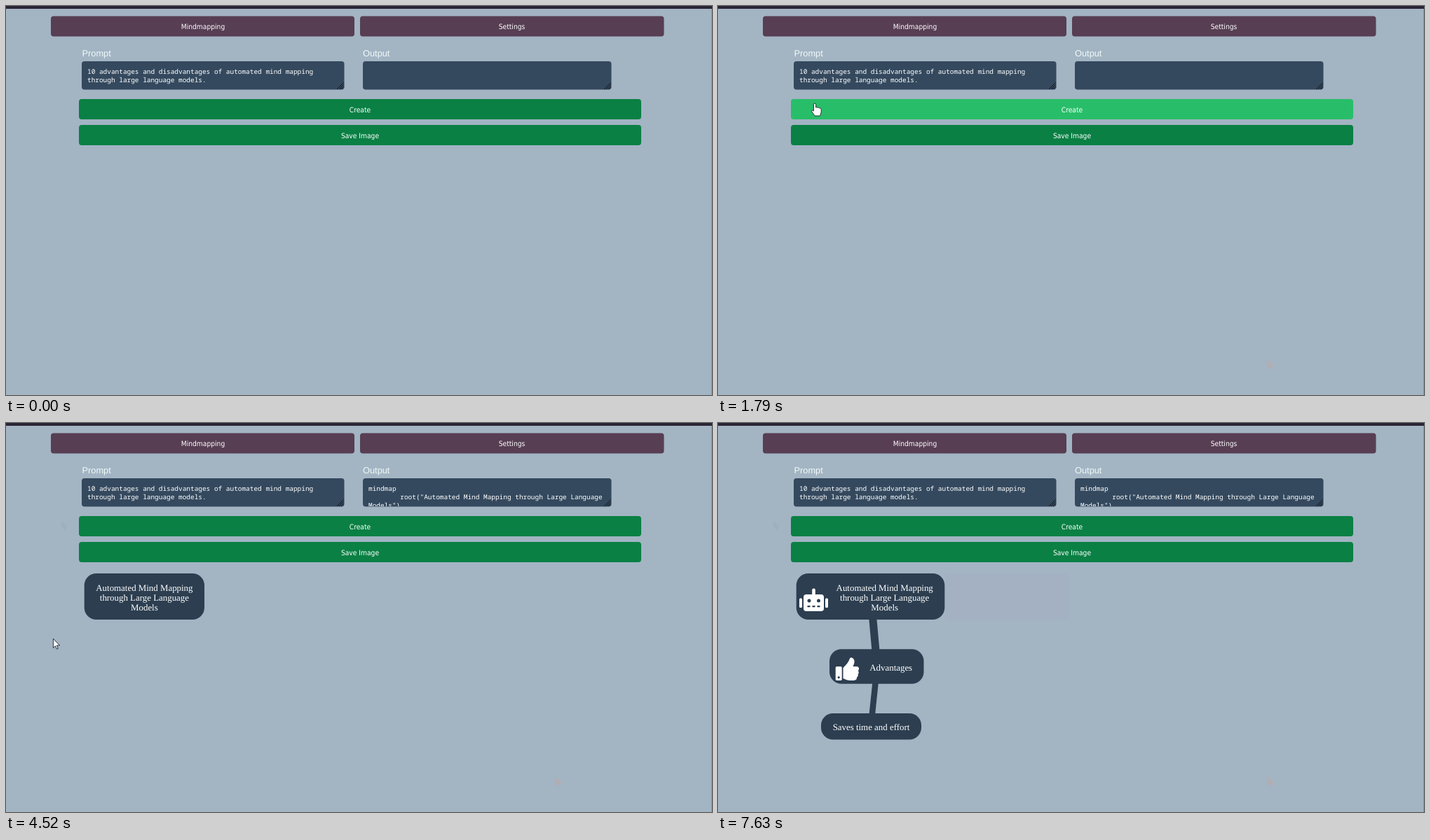
These frames come from a looping animation (1007x556 px, 8 s). An HTML page:

```html
<!DOCTYPE html>
<html lang="en">
<head>
<meta charset="utf-8">
<title>Mind mapping</title>
<style>
  html, body { margin: 0; width: 100%; height: 100%; overflow: hidden; background: #a3b4c3; }
  svg { display: block; }
  text { fill: #fff; text-rendering: geometricPrecision; white-space: pre; }
  .button { font: 10.2px "DejaVu Sans Condensed", Roboto, sans-serif; text-anchor: middle; }
  .label { font: 12.8px "Liberation Sans", Arial, sans-serif; fill: #effaf8; }
  .code { font: 9.43px "Noto Sans Mono", "DejaVu Sans Mono", monospace; }
  .node { font: 12.9px "Liberation Serif", "Times New Roman", serif; text-anchor: middle; }
  .tab { fill: #573e53; }
  .field { fill: #34495e; }
  .dark { fill: #2c3e50; }
  .edge { stroke: #2c3e50; }
  .icon { fill: #fff; }
  .pointer { fill: #fff; stroke: #1c2226; stroke-width: .9; stroke-linejoin: round; }
</style>
</head>
<body>
<svg width="1007" height="556" viewBox="0 0 1007 556">
  <defs>
    <path id="arrow" d="M.4.4V13.4L3.4 10.6 5.4 15.1 7.3 14.3 5.4 9.9H9.6Z"/>
    <path id="hand" d="M-1.6 1.2Q0-.8 1.6 1.2V6Q3 5 4.3 6.4 5.8 5.6 6.9 7 8.6 6.4 9.2 8.4V12.5L7.6 18H0L-4.4 11.5Q-4.6 9.4-2.8 10L-1.6 11.2Z"/>
    <path id="grip" d="M0 9.5L9.5 0M3 9.5L9.5 3M6 9.5L9.5 6" stroke="#14181c" fill="none"/>
    <clipPath id="outputArea"><rect x="509" y="79" width="354" height="40"/></clipPath>
  </defs>

  <rect width="1007" height="556" fill="#a3b4c3"/>
  <rect width="1007" height="4" fill="#2a2535"/>
  <rect x="1006" y="4" width="1" height="552" fill="#8795a3"/>

  <rect class="tab" x="64" y="14.5" width="433" height="29" rx="4"/>
  <rect class="tab" x="505" y="14.5" width="433.5" height="29" rx="4"/>
  <text class="button" x="281" y="33">Mindmapping</text>
  <text class="button" x="721.5" y="33">Settings</text>

  <text class="label" x="108.5" y="71.5">Prompt</text>
  <text class="label" x="509" y="71.5">Output</text>
  <rect class="field" x="108" y="79" width="374.5" height="40.5" rx="4"/>
  <rect class="field" x="509" y="79" width="354.5" height="40.5" rx="4"/>
  <text class="code" x="116" y="97">10 advantages and disadvantages of automated mind mapping</text>
  <text class="code" x="116" y="109">through large language models.</text>
  <g class="code" clip-path="url(#outputArea)">
    <text id="outputStart" x="517" y="97">mindmap</text>
    <g id="outputRoot">
      <text x="562.3" y="109">root("Automated Mind Mapping through Large Language</text>
      <text x="517" y="121">Models")</text>
    </g>
  </g>
  <use href="#grip" x="472" y="109.5"/>
  <use href="#grip" x="853" y="109.5"/>

  <rect id="create" x="104" y="133" width="802" height="29" rx="4"/>
  <rect x="104" y="170" width="802" height="29" rx="4" fill="rgb(10,128,68)"/>
  <text class="button" x="505" y="151.8">Create</text>
  <text class="button" x="505" y="188.8">Save Image</text>

  <rect id="residue" x="324" y="215" width="176" height="67" fill="#a3b1c2"/>
  <use id="trailRight" href="#arrow" x="784" y="505" fill="#b3adb1"/>
  <use id="trailLeft" href="#arrow" x="79" y="139" fill="#9eb0bd"/>

  <path id="sideEdge" class="edge" d="M217 248H413" stroke-width="11"/>
  <g id="downEdges" class="edge">
    <path d="M218 248L227 348" stroke-width="11"/>
    <path d="M227 348L218 434" stroke-width="8.5"/>
  </g>

  <g id="root">
    <rect id="rootBox" class="dark" x="111.7" y="215" height="66" rx="17"/>
    <g id="rootText" class="node">
      <text x="197.4" y="240">Automated Mind Mapping</text>
      <text x="197.4" y="254">through Large Language</text>
      <text x="197.4" y="268">Models</text>
    </g>
    <g id="robot" class="icon">
      <rect x="134.2" y="236.5" width="4.6" height="11" rx="2"/>
      <rect x="122" y="245" width="29" height="24" rx="4"/>
      <rect x="116" y="250.5" width="4" height="13.5" rx="1.5"/>
      <rect x="153" y="250.5" width="4" height="13.5" rx="1.5"/>
      <g class="dark">
        <circle cx="130" cy="254" r="2.5"/><circle cx="143.5" cy="254" r="2.5"/>
        <path d="M127.5 261h4v2.3h-4zM134.5 261h4v2.3h-4zM141.5 261h4v2.3h-4z"/>
      </g>
    </g>
  </g>

  <g id="advantages">
    <rect id="advantagesBox" class="dark" x="159" rx="17"/>
    <text id="advantagesText" class="node" y="353.5">Advantages</text>
    <g id="thumb" class="icon">
      <rect x="167.7" y="348" width="9" height="20" rx="1.8"/>
      <circle class="dark" cx="172.2" cy="363.6" r="1.6"/>
      <path d="M178.5 350L184 344Q187 340 188 336.5 189 335 191 335.4 195 337 194.5 342 194 345 192.5 348H198Q201.5 348.5 201 351.5 200.7 353 200 354 201.5 356.5 199.8 359 200.3 362 198 363.5 198.5 367 194 368H188Q184 368 178.5 365Z"/>
    </g>
  </g>

  <g id="saves">
    <rect class="dark" x="147" y="415" width="143" height="37.5" rx="17"/>
    <text class="node" x="218.5" y="439">Saves time and effort</text>
  </g>

  <circle id="click" cx="138" cy="139" r="10" fill="#ff0" fill-opacity=".47"/>
  <use id="pointer" class="pointer"/>
</svg>

<script>
const LOOP = 8000;
const el = id => document.getElementById(id);
const show = (id, on) => { el(id).style.display = on ? "" : "none"; };
const set = (id, attrs) => {
  for (const name in attrs) el(id).setAttribute(name, attrs[name]);
};

// Screen updates arrive in bursts: [first, last, count]
const bursts = [
  [200, 950, 12], [1020, 1790, 12], [1860, 1930, 2], [2270, 3020, 12],
  [3090, 3790, 11], [4520, 5280, 12], [5340, 5810, 8]
];

// Pointer path: [time, x, y]
const path = [
  [0, 880, 570], [200, 876, 545], [270, 784, 505], [480, 430, 425], [720, 180, 385],
  [950, 75, 376], [1020, 60, 362], [1300, 22, 255], [1580, 85, 155], [1650, 124, 139],
  [1790, 138, 139], [2270, 136, 140], [2700, 112, 142], [2770, 99, 140], [2880, 79, 139],
  [2950, 60.5, 146], [3020, 56, 156], [3400, 52, 265], [3790, 67, 308], [4520, 67, 308],
  [4900, 450, 425], [5280, 838, 517], [5470, 889, 526], [5740, 926, 549], [5810, 927, 562]
];

function snap(t) {
  const burst = bursts.filter(b => b[0] <= t).pop();
  if (!burst) return 0;
  const [first, last, count] = burst;
  const step = (last - first) / (count - 1);
  return first + step * Math.min(count - 1, Math.floor((t - first) / step + 0.1));
}

function pointerAt(t) {
  const next = path.findIndex(p => p[0] > t);
  if (next < 0) return path[path.length - 1].slice(1);
  const [t0, x0, y0] = path[next - 1], [t1, x1, y1] = path[next];
  const k = (t - t0) / (t1 - t0);
  return [x0 + (x1 - x0) * k, y0 + (y1 - y0) * k];
}

function ease(t, start, duration) {
  const s = Math.min(1, Math.max(0, (t - start) / duration)) ** 0.75;
  return s * s * (3 - 2 * s);
}

function drawMap(t) {
  const hasRobot = t >= 5340, hasThumb = t >= 6880, stacked = t >= 7630;
  show("root", t >= 4520);
  show("robot", hasRobot);
  set("rootBox", { width: hasRobot ? 211.6 : 171.3 });
  set("rootText", { transform: `translate(${hasRobot ? 40.3 : 0})` });

  show("advantages", t >= 6010);
  show("thumb", hasThumb);
  set("advantages", { transform: stacked ? "" : "translate(207 -100)" });
  set("advantagesBox", hasThumb
    ? { y: 323.3, width: 134.5, height: 49.4 }
    : { y: 329.3, width: 94, height: 37.4 });
  set("advantagesText", { x: hasThumb ? 246.7 : 206 });

  show("sideEdge", t >= 6010 && !stacked);
  ["downEdges", "saves", "residue"].forEach(id => show(id, stacked));
}

function draw(t) {
  const shown = snap(t);
  const [x, y] = pointerAt(shown);
  const overCreate = x >= 104 && x <= 906 && y >= 133 && y <= 162;
  set("pointer", { href: overCreate ? "#hand" : "#arrow", x, y });
  show("click", t >= 2130 && t < 2270);

  const hover = ease(shown, 1622, 255) - ease(shown, 2756, 255);
  const mix = (a, b) => Math.round(a + (b - a) * hover);
  set("create", { fill: `rgb(${mix(10, 46)},${mix(128, 204)},${mix(68, 113)})` });

  show("trailRight", t >= 340);
  show("trailLeft", t >= 2950);
  show("outputStart", t >= 3790);
  show("outputRoot", t >= 4520);
  drawMap(t);
}

const origin = performance.now();
function frame() {
  draw((performance.now() - origin) % LOOP);
  requestAnimationFrame(frame);
}
frame();
</script>
</body>
</html>
```
